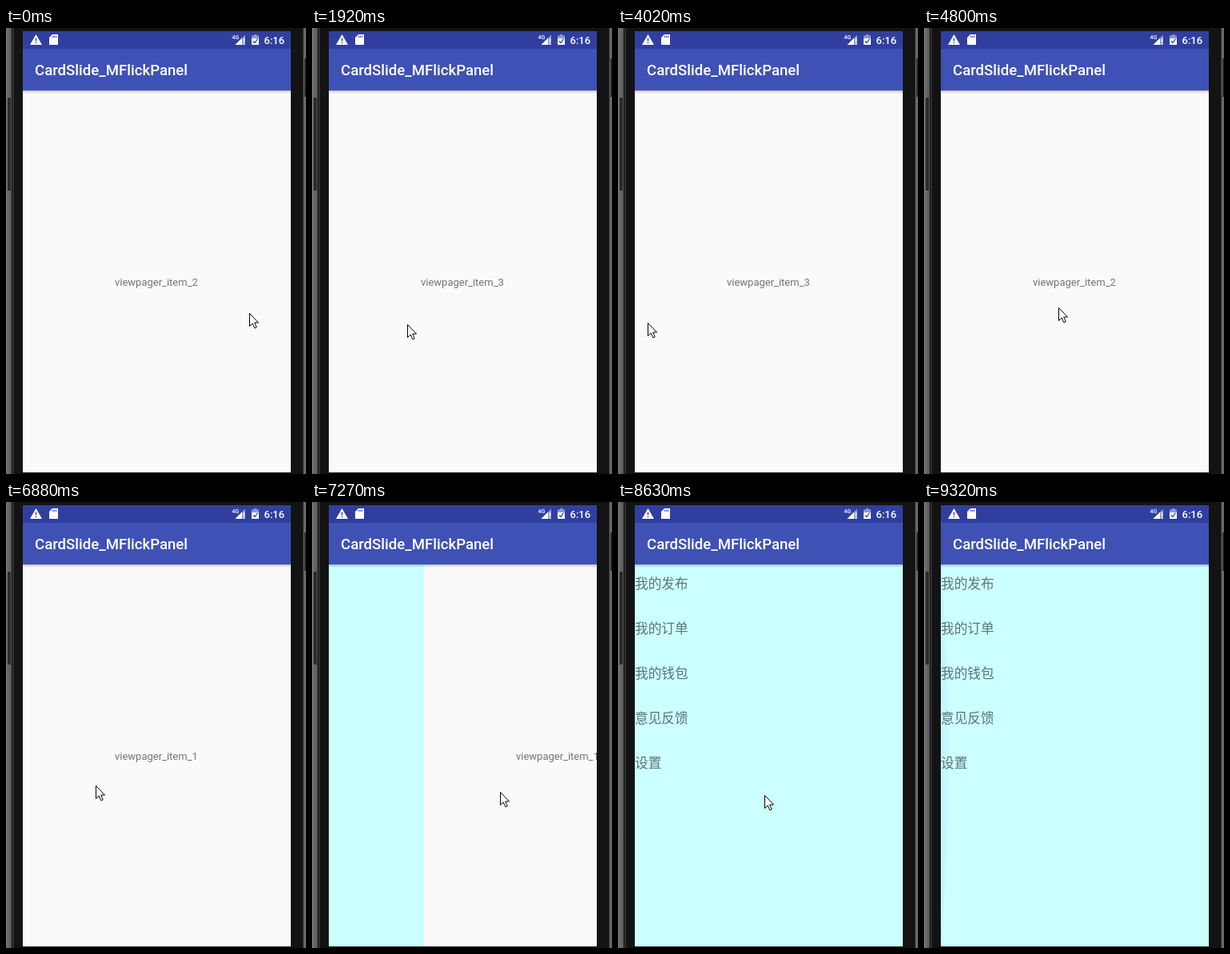
These frames come from a looping animation (375 px wide and 557 px high, 9840 ms). An HTML page:

```html
<!DOCTYPE html>
<html lang="en">
<head>
<meta charset="utf-8">
<title>Pager with side menu</title>
<style>
html, body { margin: 0; width: 100%; height: 100%; overflow: hidden; background: #131313; }
svg { display: block; }
text { font-family: Roboto, sans-serif; }
.item { font-size: 13px; fill: #747474; }
.menu { font: 16.7px "Noto Sans CJK SC", "Noto Sans CJK", sans-serif; fill: #5e7575; }
.bar { fill: #fff; font-weight: 500; }
</style>
</head>
<body>
<svg width="375" height="557" viewBox="0 0 375 557">
  <defs>
    <linearGradient id="side">
      <stop stop-color="#777"/><stop offset="1" stop-color="#555"/>
    </linearGradient>
    <linearGradient id="shade" x2="0" y2="1">
      <stop stop-opacity=".22"/><stop offset="1" stop-opacity="0"/>
    </linearGradient>
  </defs>

  <!-- phone body -->
  <rect width="375" height="557" fill="#131313"/>
  <rect width="7" height="557" fill="url(#side)"/>
  <rect x="8" width="2" height="557" fill="#303030"/>
  <rect x="2" y="87" width="4" height="116" rx="1" fill="#2b2b2b"/>
  <rect x="371" width="1" height="557" fill="#303030"/>
  <rect x="372" width="3" height="557" fill="#686868"/>
  <rect x="373" y="38" width="2" height="48" fill="#2b2b2b"/>

  <!-- scrolling content -->
  <svg x="21" y="78" width="335" height="477">
    <rect width="335" height="477" fill="#fafafa"/>
    <g id="pages"><rect x="-335" width="335" height="477" fill="#cff"/></g>
    <path id="glowL" fill="#3f51b5"/>
    <path id="glowR" fill="#3f51b5"/>
  </svg>

  <!-- bars -->
  <rect x="21" y="78" width="335" height="4" fill="url(#shade)"/>
  <rect x="21" y="4" width="335" height="22" fill="#303f9f"/>
  <rect x="21" y="26" width="335" height="52" fill="#3f51b5"/>
  <path d="M37.5 8L45 21H30Z" fill="#fff"/>
  <path d="M37.5 12.5V16.5M37.5 17.8V19.3" stroke="#303f9f" stroke-width="1.4"/>
  <path d="M58 8H65V21H54V12Z" fill="#fff"/>
  <path d="M58.7 9.5V12M60.7 9.5V12M62.7 9.5V12" stroke="#303f9f"/>
  <text class="bar" x="282.5" y="14" font-size="7">4G</text>
  <path d="M299 8.5V21H286.5Z" fill="#8f98cc"/>
  <path d="M295 12.5V21H286.5Z" fill="#fff"/>
  <path d="M297.5 13V18M297.5 19V21" stroke="#fff" stroke-width="1.4"/>
  <path d="M307 9.5H310V8H313.5V9.5H316V21H307Z" fill="#8f98cc"/>
  <path d="M307 13H316V21H307Z" fill="#fff"/>
  <path d="M309 16.5L311 18.5L314.5 13.5" fill="none" stroke="#303f9f" stroke-width="1.3"/>
  <text class="bar" x="322.5" y="20" font-size="13">6:16</text>
  <text class="bar" x="36" y="59" font-size="18.6">CardSlide_MFlickPanel</text>

  <path id="cursor" d="M.5 .5V16.5L4.2 13L6.8 18.8L9.2 17.8L6.7 12H11.5Z" fill="#fff" stroke="#000"/>
</svg>
<script>
const LOOP = 9840, PAGE = 335, HEIGHT = 477;
const byId = id => document.getElementById(id);
const pages = byId("pages");

function addText(cls, x, y, content) {
  const el = document.createElementNS("http://www.w3.org/2000/svg", "text");
  el.setAttribute("class", cls);
  el.setAttribute("x", x);
  el.setAttribute("y", y);
  el.textContent = content;
  pages.append(el);
}
for (let i = 0; i < 3; i++) addText("item", 115 + i * PAGE, 244, "viewpager_item_" + (i + 1));
["我的发布", "我的订单", "我的钱包", "意见反馈", "设置"]
  .forEach((label, i) => addText("menu", -PAGE, 30 + 56 * i, label));

// Smooth 0 to 1 between two times, and a rise and fall between them
function ease(t, from, to) {
  const u = Math.min(1, Math.max(0, (t - from) / (to - from)));
  return u * u * (3 - 2 * u);
}
const bump = (t, from, to) => Math.sin(Math.PI * Math.min(1, Math.max(0, (t - from) / (to - from))));

// Pages turn 2, 3, 2, 1, then the menu is dragged in and snaps open
function scrollAt(t) {
  const turns = 1 + ease(t, 170, 900) - ease(t, 4050, 4650) - ease(t, 5110, 5800);
  const drag = 237 * ease(t, 6880, 7660);
  const snap = (PAGE - 237) * ease(t, 8080, 8350);
  return PAGE * turns - 39 * bump(t, 2830, 3460) - drag - snap;
}

// Each move goes to x, y and swings sideways on the way
function pointerAt(t) {
  let x = 304, y = 356;
  const move = (from, to, toX, toY, swing = 0) => {
    const e = ease(t, from, to);
    x += (toX - x) * e + swing * bump(t, from, to);
    y += (toY - y) * e;
  };
  move(110, 1110, 292, 354, -180);
  move(1200, 1920, 119, 370);
  move(2310, 2950, 122, 366, 170);
  move(2950, 3340, 26, 368);
  move(4010, 4800, 168, 349, 255);
  move(4800, 4920, 38, 345);
  move(5060, 6600, 112, 354, 310);
  move(6880, 7660, 357, 370);
  move(8080, 9300, 390, 360, -190);
  return [Math.round(x), Math.round(y)];
}

function drawGlow(id, edge, dir, size) {
  const el = byId(id);
  el.setAttribute("d", `M${edge} 2Q${edge + dir * size * 2} ${HEIGHT / 2} ${edge} ${HEIGHT - 2}Z`);
  el.setAttribute("opacity", size * size * 0.00043);
}

const start = performance.now();
function draw(now) {
  const t = Math.max(0, now - start) % LOOP;
  pages.setAttribute("transform", `translate(${-scrollAt(t)})`);
  byId("cursor").setAttribute("transform", `translate(${pointerAt(t)})`);
  drawGlow("glowL", 0, 1, 10 * ease(t, 8580, 9050));
  drawGlow("glowR", PAGE, -1, 18 * bump(t, 2560, 3340));
  requestAnimationFrame(draw);
}
draw(start);
</script>
</body>
</html>
```
